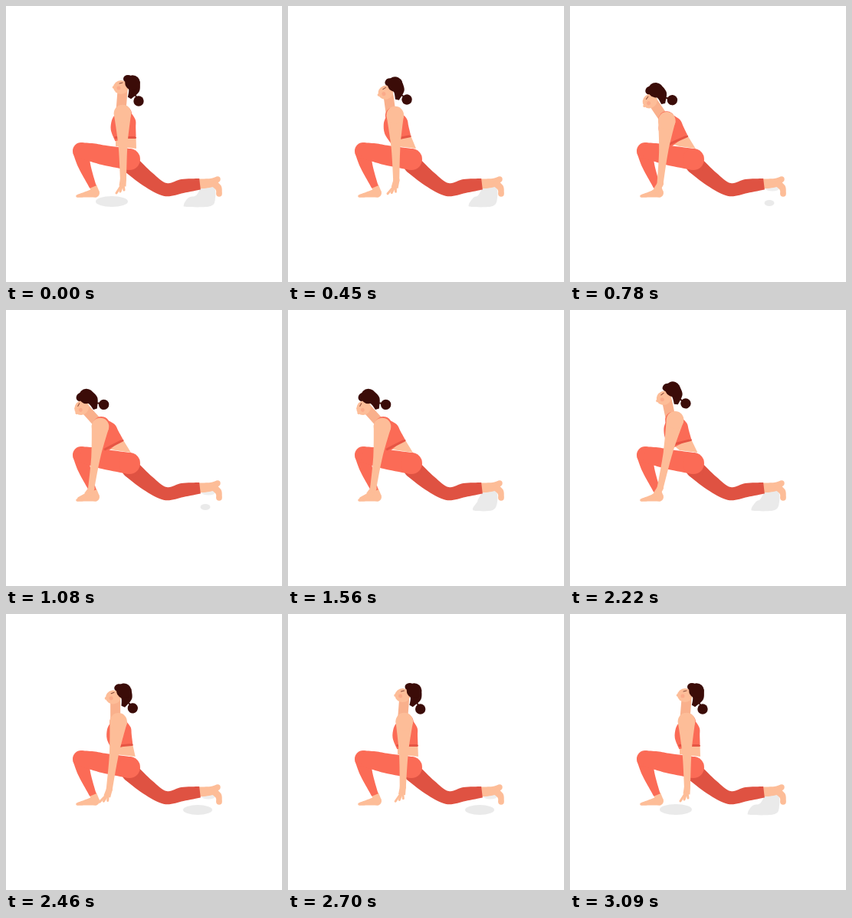
Write an HTML page with a canvas that moves like this. It is 360 by 360 pixels and loops after 3600 ms.

```html
<!DOCTYPE html>
<html lang="en">
<head>
<meta charset="utf-8">
<title>Lunge stretch</title>
<style>
html, body { margin: 0; width: 100%; height: 100%; overflow: hidden; background: #fff; }
canvas { display: block; width: 360px; height: 360px; }
</style>
</head>
<body>
<canvas id="stage" width="360" height="360"></canvas>
<script>
const ctx = document.getElementById('stage').getContext('2d');
const LOOP = 3600, STEP = 30;
const CORAL = '#fb6b56', BAND = '#e65544', RED = '#df5242', SKIN = '#fdbd98',
      NECK = '#f9b08c', HAIR = '#3b0c08', GREY = '#eaeaea';

const clamp = u => Math.min(1, Math.max(0, u));
const ease = u => (1 - Math.cos(Math.PI * clamp(u))) / 2;
const rad = deg => deg * Math.PI / 180;

// Rises from 0 to 1 between a and b, falls back between c and d
const swing = (t, a, b, c, d) =>
  ease((t - a) / (b - a)) - ease((t - c) / (d - c));

// Adds a smooth curve through the points to the current path
function spline(pts, closed) {
  const n = pts.length, last = n - 1;
  const at = i => pts[closed ? (i + n) % n : Math.min(last, Math.max(0, i))];
  ctx.lineTo(...pts[0]);
  for (let i = 0; i < (closed ? n : last); i++) {
    const [p, a, b, q] = [at(i - 1), at(i), at(i + 1), at(i + 2)];
    ctx.bezierCurveTo(
      a[0] + (b[0] - p[0]) / 6, a[1] + (b[1] - p[1]) / 6,
      b[0] - (q[0] - a[0]) / 6, b[1] - (q[1] - a[1]) / 6, ...b);
  }
}

function shape(color, trace) {
  ctx.beginPath();
  trace();
  ctx.fillStyle = color;
  ctx.fill();
}

const blob = (color, ...pts) => shape(color, () => spline(pts, true));

const oval = (color, x, y, rx, ry = rx) =>
  shape(color, () => ctx.ellipse(x, y, rx, ry, 0, 0, 7));

// Tapered limb along joints [x, y, radius]: round start, flat end
function limb(color, ...joints) {
  const side = sign => joints.map(([x, y, r], i) => {
    const a = joints[Math.max(0, i - 1)];
    const b = joints[Math.min(joints.length - 1, i + 1)];
    const dx = b[0] - a[0], dy = b[1] - a[1], k = sign * r / Math.hypot(dx, dy);
    return [x - dy * k, y + dx * k];
  });
  shape(color, () => {
    spline(side(1));
    spline(side(-1).reverse());
  });
  oval(color, ...joints[0]);
}

function line(color, width, from, to) {
  ctx.beginPath();
  ctx.moveTo(...from);
  ctx.lineTo(...to);
  ctx.strokeStyle = color;
  ctx.lineWidth = width;
  ctx.lineCap = 'round';
  ctx.stroke();
}

// A moving frame of reference with its own drawing and point lookup
function frame(x, y, deg) {
  const c = Math.cos(rad(deg)), s = Math.sin(rad(deg));
  return {
    point: (dx, dy) => [x + dx * c - dy * s, y + dx * s + dy * c],
    draw(paint) {
      ctx.save();
      ctx.translate(x, y);
      ctx.rotate(rad(deg));
      paint();
      ctx.restore();
    }
  };
}

function drawShadows(t, lean) {
  if (t < 225 || t >= 2775) oval(GREY, 138, 255, 21, 7);
  const small = t >= 615 && t < 1170, flat = t >= 2340 && t < 2775;
  if (small) oval(GREY, 260, 257, 6.5, 4);
  if (flat) oval(GREY, 250, 255.5, 19, 6.5);
  if (small || flat) {
    oval('#eeeeee', 264, 238, 9, 3.5);
  } else {
    const x = 232 + 9 * lean;
    blob(GREY, [x, 259], [x + 6, 250], [248, 247], [256, 236], [271, 236],
      [273, 250], [267, 261], [x + 4, 262]);
  }
}

function drawBackLeg() {
  limb(SKIN, [276, 226, 3.7], [268, 230.5, 5.7], [252, 232, 6.5]);
  limb(SKIN, [278, 245, 3.8], [277, 237, 4.3], [269, 230, 5]);
  limb(RED, [163, 207, 12], [185, 226, 10.3], [208, 239.5, 8.6], [230, 235, 9],
    [253, 232.3, 7.3]);
}

function drawFrontLeg() {
  limb(SKIN, [93, 248, 1.8], [106, 245.5, 4], [117, 243.5, 6]);
  limb(SKIN, [116.5, 244, 5.5], [113.5, 234, 4.5]);
  limb(CORAL, [98, 189, 11], [102.5, 209, 8], [113.5, 236, 4.5]);
  limb(CORAL, [161, 200, 14], [130, 195, 13], [112, 191, 12], [97, 188.5, 10.5]);
}

function drawBust() {
  limb(CORAL, [-3, -33, 11], [-2.5, -25, 15.5], [-3, -14, 16.3], [0, -1, 14]);
  line(BAND, 3, [-13, -2.5], [12.5, -2.5]);
}

function drawHead() {
  oval(SKIN, -14, 2, 10, 9);
  oval(SKIN, -23.5, 2, 1.8);
  oval('#fbaa8a', -17, 3, 2.5);
  line('#8a4a38', 1, [-16, -3], [-12, -4]);
  line(HAIR, 2, [5, 13], [8, 17]);
  oval(HAIR, -5, -9, 6, 5);
  limb(HAIR, [1, -4, 9.8], [3, 6, 7], [-3, 16, 2.5]);
  oval(HAIR, 9, 20, 6.7);
}

function drawHand() {
  limb(SKIN, [0, -1, 4], [-1, 9, 4.5]);
  for (let i = 0; i < 3; i++) line(SKIN, 3, [i - 2, 7], [5 * i - 9, 18 - 2 * i]);
}

function draw(t) {
  const lean = swing(t, 0, 1000, 1700, 2760);
  const reach = swing(t, 150, 1000, 2000, 2850);
  const drop = lean * lean;
  const head = frame(164 - 57 * lean, 104 + 12 * drop, -46 * lean);
  const bust = frame(156 - 14 * Math.sin(lean * Math.PI / 2), 174 + 4 * drop, -27 * lean);
  const shoulder = [152 - 29 * lean, 140 + 12 * drop];
  const wrist = [153 - 42 * reach, 226 + 8 * reach];
  const elbow = [0, 1].map(i => shoulder[i] * .52 + wrist[i] * .48);

  ctx.fillStyle = '#fff';
  ctx.fillRect(0, 0, 360, 360);
  drawShadows(t, lean);
  drawBackLeg();
  drawFrontLeg();
  shape(SKIN, () => [bust.point(-13, -4), bust.point(13.5, -3), [170 - 7 * lean, 186],
    [143, 183]].forEach(p => ctx.lineTo(...p)));
  line(NECK, 13, head.point(-12, 7), bust.point(-6, -38));
  bust.draw(drawBust);
  head.draw(drawHead);
  limb(SKIN, [...shoulder, 11.3], [...elbow, 6], [...wrist, 4]);
  frame(...wrist, 28 * reach).draw(drawHand);
}

const start = performance.now();
function tick() {
  const t = (performance.now() - start) % LOOP;
  draw(Math.floor(t / STEP) * STEP);
  requestAnimationFrame(tick);
}
tick();
</script>
</body>
</html>
```
